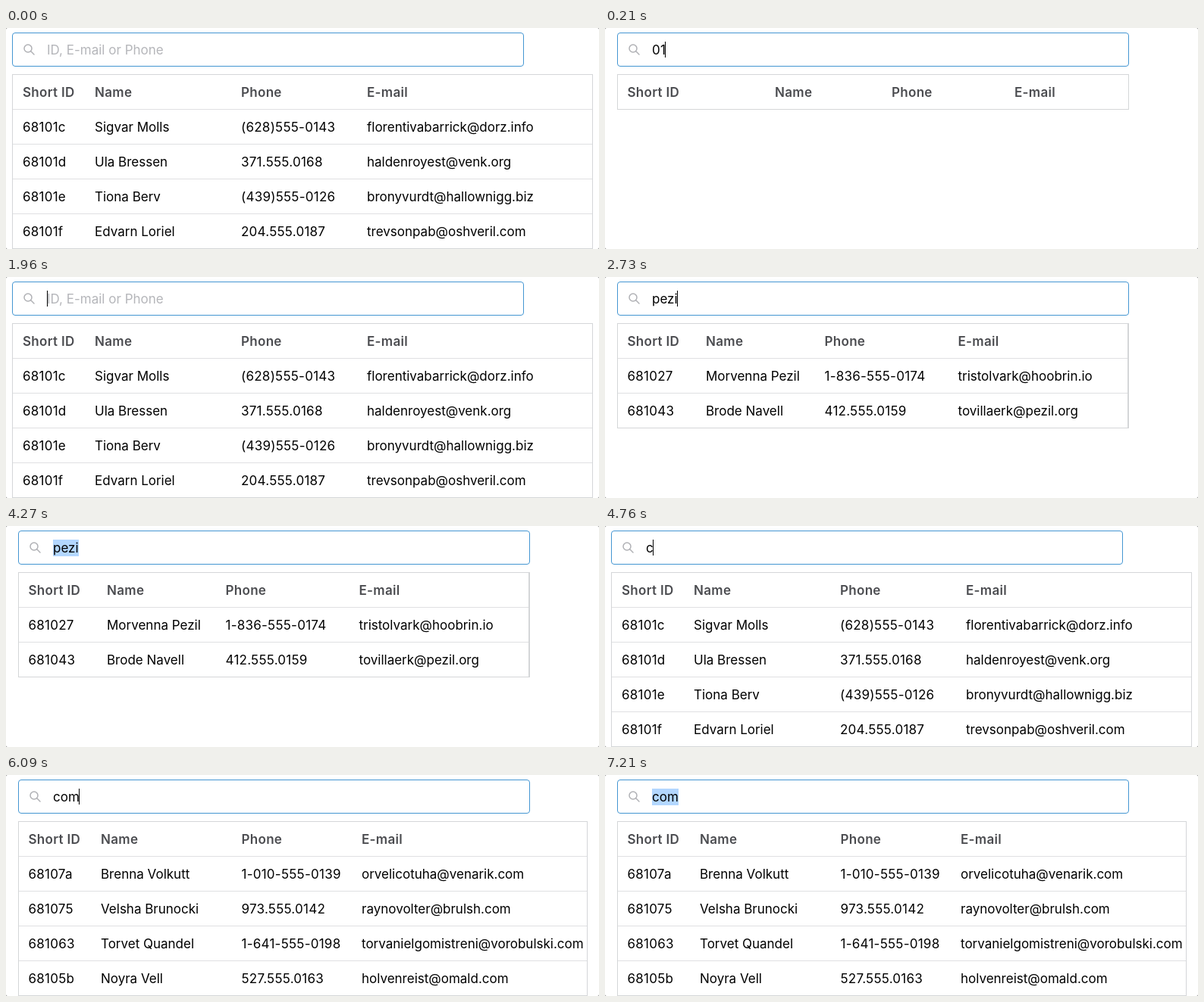
These frames come from a looping animation (782 by 292 pixels, 7.42 s). An HTML page:

```html
<!DOCTYPE html>
<html lang="en">
<head>
<meta charset="utf-8">
<title>Live search</title>
<style>
html, body { margin: 0; width: 100%; height: 100%; overflow: hidden; background: #777; }
body { font: 17px Inter, "Liberation Sans", sans-serif; color: #000; }
#stage { position: absolute; width: 782px; height: 292px; overflow: hidden; background: #fff; border-radius: 2px; }
#stage * { position: absolute; box-sizing: border-box; white-space: pre; }
#search { top: 6px; width: 675px; height: 45px; border: 1px solid #4496d2; border-radius: 4px; }
#search svg { left: 13px; top: 13px; }
#query { left: 45px; top: 11px; height: 22px; line-height: 22px; }
#query.empty { color: #b5b6ba; }
#query.digits { letter-spacing: .25px; }
#query.selected { background: #b3d7ff; }
#caret { top: 18px; width: 1px; height: 21px; background: #000; }
#table { top: 61px; border: 1px solid #d4d6d8; }
.row { left: 0; width: 100%; height: 46px; line-height: 46px; border-bottom: 1px solid #dfe0e2; }
.row:last-child { border: 0; }
.head { font-weight: 600; color: #4b4c50; letter-spacing: .3px; }
.row:not(.head) :nth-child(odd) { letter-spacing: .25px; }
</style>
</head>
<body>
<div id="stage">
  <div id="search">
    <svg width="18" height="18" fill="none" stroke="#b0b1b5" stroke-width="1.5" stroke-linecap="round">
      <circle cx="7" cy="7" r="5"/><path d="M10.8 10.8 15 15"/>
    </svg>
    <span id="query"></span>
  </div>
  <div id="caret"></div>
  <div id="table"></div>
</div>
<script>
const LOOP = 7420;
const HEAD = ['Short ID', 'Name', 'Phone', 'E-mail'];
const shared = ['68107a', 'Brenna Volkutt', '1-010-555-0139', 'orvelicotuha@venarik.com'];

// x: left edge, right: table's right edge, cols: text positions
const views = {
  all: { x: 8, right: 774, cols: [22, 117, 310, 476], rows: [
    ['68101c', 'Sigvar Molls', '(628)555-0143', 'florentivabarrick@dorz.info'],
    ['68101d', 'Ula Bressen', '371.555.0168', 'haldenroyest@venk.org'],
    ['68101e', 'Tiona Berv', '(439)555-0126', 'bronyvurdt@hallownigg.biz'],
    ['68101f', 'Edvarn Loriel', '204.555.0187', 'trevsonpab@oshveril.com']] },
  none: { x: 16, right: 691, cols: [29.5, 224, 378, 540], rows: [] },
  phone: { x: 16, right: 700, cols: [29.5, 125, 270, 427.5], rows: [
    ['68107b', 'Ardelo Vost', '(010)555-0172', 'vorlandbessik@griedelann.net'],
    shared] },
  name: { x: 16, right: 691, edge: 2, cols: [29.5, 133, 289.5, 465.5], rows: [
    ['681027', 'Morvenna Pezil', '1-836-555-0174', 'tristolvark@hoobrin.io'],
    ['681043', 'Brode Navell', '412.555.0159', 'tovillaerk@pezil.org']] },
  mail: { x: 16, right: 767, cols: [29.5, 125, 310.5, 469], rows: [
    shared,
    ['681075', 'Velsha Brunocki', '973.555.0142', 'raynovolter@brulsh.com'],
    ['681063', 'Torvet Quandel', '1-641-555-0198', 'torvanielgomistreni@vorobulski.com'],
    ['68105b', 'Noyra Vell', '527.555.0163', 'holvenreist@omald.com']] }
};

// [start ms, query, view, cursor]
const steps = [
  [0, '', 'all', 'off'],
  [70, '0', 'all', 'on'],
  [210, '01', 'none', 'on'],
  [280, '010', 'phone', 'on'],
  [770, '010', 'phone', 'off'],
  [1120, '010', 'phone', 'selected'],
  [1960, '', 'all', 'on'],
  [2380, 'p', 'all', 'on'],
  [2450, 'pe', 'none', 'on'],
  [2590, 'pez', 'none', 'on'],
  [2730, 'pezi', 'name', 'on'],
  [3220, 'pezi', 'name', 'off'],
  [3780, 'pezi', 'name', 'on'],
  [4270, 'pezi', 'name', 'selected'],
  [4760, 'c', 'all', 'on'],
  [4900, 'co', 'none', 'on'],
  [5040, 'com', 'mail', 'on'],
  [5530, 'com', 'mail', 'off'],
  [6090, 'com', 'mail', 'on'],
  [6580, 'com', 'mail', 'off'],
  [7140, 'com', 'mail', 'on'],
  [7210, 'com', 'mail', 'selected']
];

const [search, query, caret, table] =
  ['search', 'query', 'caret', 'table'].map(id => document.getElementById(id));

function drawTable({ x, right, edge = 1, cols, rows }) {
  table.style.left = x + 'px';
  table.style.width = right - x + 'px';
  table.style.height = 47 + rows.length * 46 + 'px';
  table.style.borderRightWidth = edge + 'px';
  table.innerHTML = [HEAD, ...rows].map((cells, r) =>
    `<div class="row${r ? '' : ' head'}" style="top:${r * 46}px">` +
    cells.map((text, c) => `<span style="left:${cols[c] - x - 1}px">${text}</span>`).join('') +
    '</div>').join('');
}

function draw([, text, viewName, cursor]) {
  const view = views[viewName];
  search.style.left = view.x + 'px';
  query.textContent = text || 'ID, E-mail or Phone';
  query.className = !text ? 'empty' : (/\d/.test(text) ? 'digits ' : '') + cursor;
  caret.hidden = cursor !== 'on';
  caret.style.left = Math.round(view.x + 46 + (text ? query.offsetWidth - 1 : 0)) + 'px';
  drawTable(view);
}

let current;
function tick(now) {
  const step = steps.findLast(([start]) => start <= now % LOOP);
  if (step !== current) draw(current = step);
  requestAnimationFrame(tick);
}
tick(performance.now());
</script>
</body>
</html>
```
